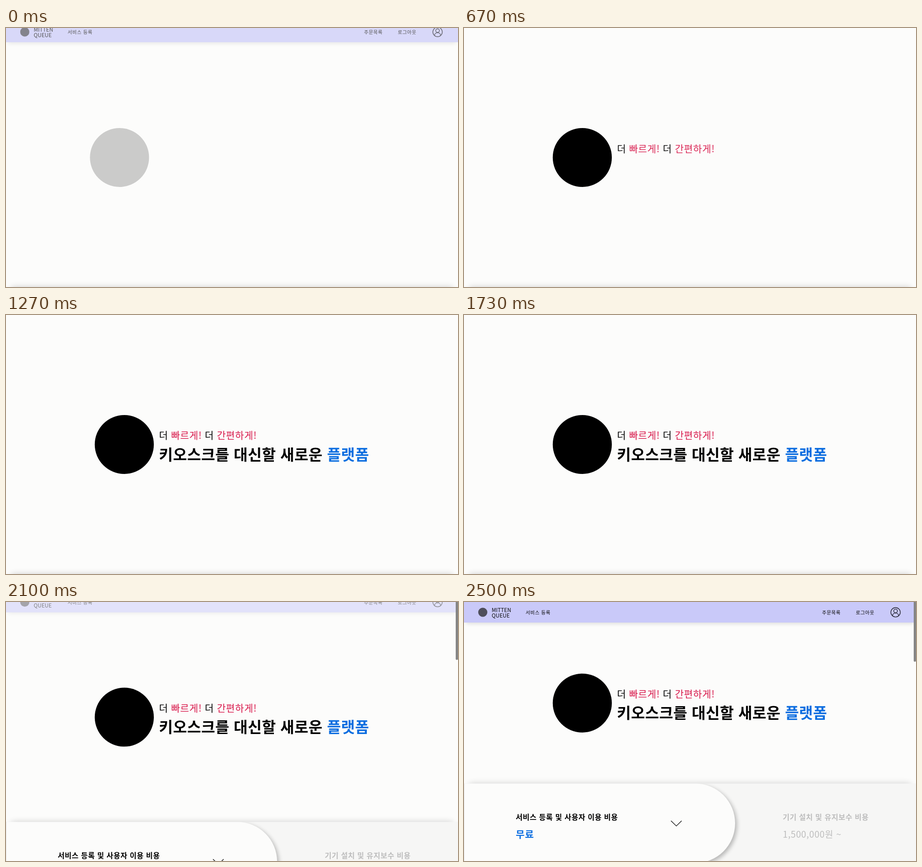
These frames come from a looping animation (987x567 px, 2530 ms). An HTML page:

```html
<!DOCTYPE html>
<html lang="ko">
<head>
<meta charset="utf-8">
<title>주문 플랫폼</title>
<style>
  html, body { margin: 0; width: 100%; height: 100%; overflow: hidden; background: #fcfcfb; }
  svg { display: block; width: 987px; height: 567px; }
  text { font-family: "Noto Sans CJK KR", "Noto Sans CJK JP", "Noto Sans CJK", sans-serif; white-space: pre; }
  .bold { font-weight: 700; }
  .thin { font-weight: 300; }
  .blue { fill: #0d6ee0; }
  .red { fill: #d8174a; }
  .nav { font-size: 10.5px; letter-spacing: .5px; }
  .brand { font-size: 11.6px; letter-spacing: .1px; }
  .lead { font-size: 21px; letter-spacing: .6px; }
  .head { font-size: 33px; letter-spacing: .37px; }
  .label { font-size: 16px; letter-spacing: .53px; }
  .price { font-size: 19.5px; letter-spacing: .6px; }
</style>
</head>
<body>
<svg viewBox="0 0 987 567" xmlns="http://www.w3.org/2000/svg">
  <defs>
    <filter id="blur" x="-20%" y="-40%" width="140%" height="180%">
      <feGaussianBlur stdDeviation="5"/>
    </filter>
    <filter id="soft" x="-20%" y="-40%" width="140%" height="180%">
      <feGaussianBlur stdDeviation="7"/>
    </filter>
    <clipPath id="below"><rect width="987" height="180"/></clipPath>
  </defs>
  <rect width="987" height="567" fill="#fcfcfb"/>

  <g id="hero">
    <circle id="logo" cx="258.3" cy="283.5" r="64.5"/>
    <text id="lead" class="lead thin" x="334" y="271.3">더 <tspan class="red">빠르게!</tspan> 더 <tspan class="red">간편하게!</tspan></text>
    <text id="head" class="head bold" x="334" y="317.7">키오스크를 대신할 새로운 <tspan class="blue">플랫폼</tspan></text>
  </g>

  <g id="costs">
    <rect x="12" y="0" width="963" height="174" opacity=".18" filter="url(#soft)"/>
    <rect width="987" height="175" fill="#f6f6f5"/>
    <g clip-path="url(#below)">
      <path d="M0 0H505A87 87 0 0 1 505 174H0Z" transform="translate(4 4)" opacity=".26" filter="url(#blur)"/>
    </g>
    <path d="M0 0H505A87 87 0 0 1 505 174H0Z" fill="#fcfcfb"/>
    <path d="M.5 0V174" stroke="#e6e6e6"/>
    <text class="label bold" x="113" y="79.8">서비스 등록 및 사용자 이용 비용</text>
    <text class="lead bold blue" x="113" y="118.8">무료</text>
    <path d="M452 81.5L463.6 93L475.2 81.5" fill="none" stroke="#111" stroke-width="1.4"/>
    <text class="label bold" x="696" y="79.8" fill="#bdbdbd">기기 설치 및 유지보수 비용</text>
    <text class="price" x="696" y="119" fill="#bdbdbd">1,500,000원 ~</text>
  </g>

  <g id="bar">
    <rect x="4" y="3" width="979" height="46" opacity=".13" filter="url(#blur)"/>
    <rect width="987" height="46.3" fill="#c8c8f9"/>
    <circle cx="41" cy="23.8" r="10" fill="#4a4a58"/>
    <text class="brand thin" x="60.5" y="23">MITTEN</text>
    <text class="brand thin" x="60.5" y="35.3">QUEUE</text>
    <text class="nav" x="134.6" y="28.3">서비스 등록</text>
    <text class="nav" x="781.8" y="28.3">주문목록</text>
    <text class="nav" x="855.5" y="28.3">로그아웃</text>
    <g fill="none" stroke="#1c1c28" stroke-width="1.4">
      <circle cx="942.4" cy="23.8" r="10.3"/>
      <circle cx="942.4" cy="20.9" r="4"/>
      <path d="M935.6 31.4C936.6 23.4 948.2 23.4 949.2 31.4"/>
    </g>
  </g>

  <rect id="thumb" x="982" y="-4" width="5" rx="2.5" fill="#858585"/>
</svg>
<script>
const LOOP = 2530, BAR = 46.3, COSTS = 174.4, STAGE = 567, RETURN = 1870;
const el = id => document.getElementById(id);
const [hero, logo, lead, head, costs, bar, thumb] =
  ["hero", "logo", "lead", "head", "costs", "bar", "thumb"].map(el);

// cubic-bezier(.25, .1, .25, 1)
function ease(p) {
  if (p <= 0) return 0;
  if (p >= 1) return 1;
  let lo = 0, hi = 1;
  for (let i = 0; i < 24; i++) {
    const s = (lo + hi) / 2;
    if (.75 * s * (1 - s) + s ** 3 < p) lo = s; else hi = s;
  }
  const s = lo, r = 1 - s;
  return .3 * s * r * r + 3 * r * s * s + s ** 3;
}
const run = (t, start, length) => ease((t - start) / length);

function place(node, x, y, opacity = 1) {
  node.setAttribute("transform", `translate(${x.toFixed(2)} ${y.toFixed(2)})`);
  node.setAttribute("opacity", opacity.toFixed(3));
}
function enter(node, p, dx, dy) {
  place(node, dx * (1 - p), dy * (1 - p), p);
}

function draw(t) {
  const back = run(t, RETURN, 800);
  const shown = t < RETURN ? 1 - run(t, -170, 800) : back;
  const bottom = STAGE - COSTS * back;

  place(bar, 0, -BAR * (1 - shown), shown);
  place(hero, 0, (BAR * back + bottom - STAGE) / 2);
  place(costs, 0, bottom);

  enter(logo, run(t, -77, 500), -13, 0);
  enter(lead, run(t, 330, 500), 0, 5.5);
  enter(head, run(t, 832, 500), 0, -4.3);

  thumb.setAttribute("height", (126.8 + 8.2 * back).toFixed(2));
  thumb.setAttribute("opacity", t < RETURN ? 0 : 1);
}

const begin = performance.now();
function tick() {
  draw((performance.now() - begin) % LOOP);
  requestAnimationFrame(tick);
}
tick();
</script>
</body>
</html>
```
